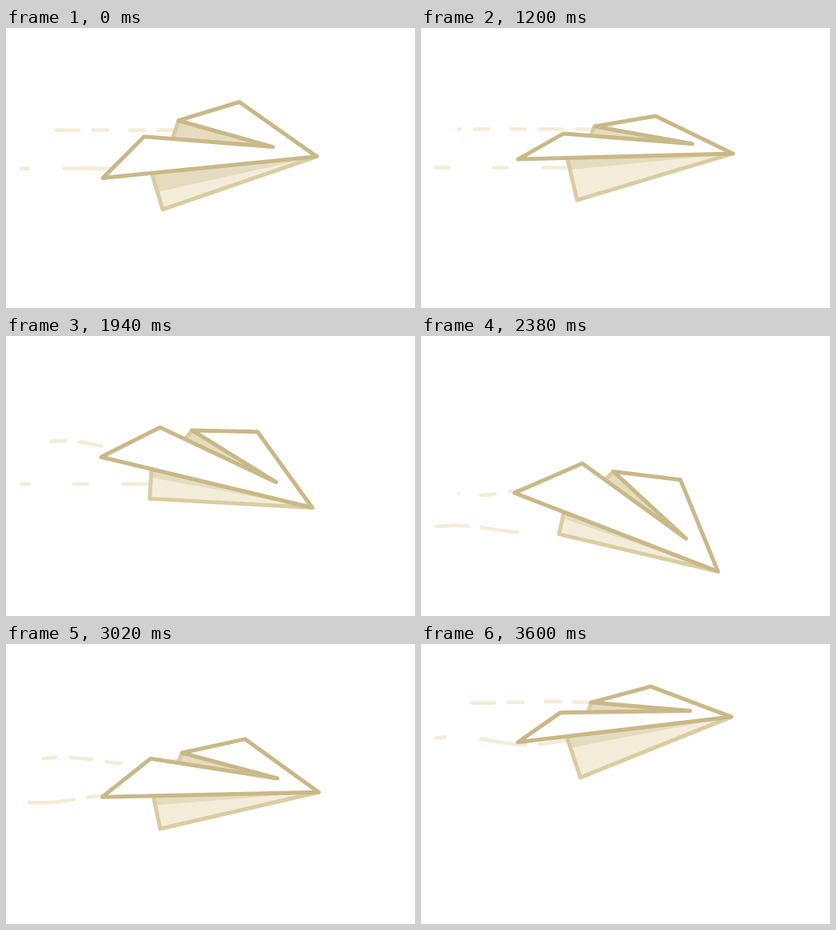
Recreate the animation shown at these times as an HTML page with a canvas. Size 512x350 px, loop 3.62 s.

```html
<!DOCTYPE html>
<html lang="en">
<head>
<meta charset="utf-8">
<title>Paper plane</title>
<style>
  html, body { margin: 0; width: 100%; height: 100%; overflow: hidden; background: #fff; }
  canvas { display: block; width: 512px; height: 350px; }
</style>
</head>
<body>
<canvas id="stage" width="512" height="350"></canvas>
<script>
const ctx = document.getElementById('stage').getContext('2d');
const LOOP = 3620, STEP = 20;
const COLOR = { trail: '#f4ecd9', wing: '#c9b888', keel: '#dacca1', light: '#f3ecd9', shade: '#e5dcc0' };

// Corners of the folded paper around the middle of its wing edge: fold, notch, far wing, far tip, keel
const LEVEL = [[-77, -30.5], [84, -13.5], [-37.5, -38.5], [39, -49.5], [-62, 53]];
const DIVING = [[-70.5, -65], [84.5, -24], [-30.5, -69.5], [51.5, -90], [-66, 28]];
const LAUNCHED = [[-78, -46.5], [81, -17.5], [-33, -62], [45, -77.5], [-64, 46.5]];

const trails = [
  { from: 47, to: 212, drop: 0, dash: [28, 18, 18, 28, 18, 18], start: 63, speed: .2487,
    trough: 72, swing: 6, peak: 1940, period: 960 },
  { from: 19, to: 182, drop: 48, dash: [57, 17, 45.5, 56, 17, 45], start: 73, speed: .3293,
    trough: 43, swing: 5, peak: 2270, period: 1320 }
];

// Eases between turning points, each a [time, value]
function sway(t, ...turns) {
  const next = turns.findIndex(([at]) => at > t);
  if (next < 0) return turns[turns.length - 1][1];
  if (next === 0) return turns[0][1];
  const [t0, v0] = turns[next - 1], [t1, v1] = turns[next];
  return v0 + (v1 - v0) * (1 - Math.cos(Math.PI * (t - t0) / (t1 - t0))) / 2;
}

function flightAt(t) {
  return {
    y: sway(t, [-680, 165], [740, 184.5], [1520, 147], [2600, 256], [3510, 102], [4050, 175]),
    tilt: sway(t, [0, -5.75], [1250, -1.5], [2390, 21.1], [3350, -9.3], [3850, -4.2]) * Math.PI / 180,
    roll: sway(t, [1260, 0], [2390, 1], [3600, 0]),
    launch: sway(t, [0, 1], [1220, 0])
  };
}

function shape(points, fill, stroke) {
  ctx.beginPath();
  points.forEach(p => ctx.lineTo(...p));
  ctx.closePath();
  if (fill) { ctx.fillStyle = fill; ctx.fill(); }
  if (stroke) { ctx.strokeStyle = stroke; ctx.lineWidth = 5; ctx.stroke(); }
}

function drawTrail(trail, t, { y, roll, launch }) {
  const height = y - 34 - 12.5 * launch - 18 * roll + trail.drop;
  const bend = trail.swing * sway(t, [1500, 0], [1900, 1]) * Math.cos(2 * Math.PI * (t - trail.peak) / trail.period);
  ctx.beginPath();
  for (let x = trail.from; x <= trail.to; x += 3) {
    ctx.lineTo(x, height - bend * Math.cos(2 * Math.PI * (x - trail.trough) / 180));
  }
  const length = trail.dash.reduce((sum, d) => sum + d);
  ctx.setLineDash(trail.dash);
  ctx.lineDashOffset = (trail.from - trail.start + trail.speed * t + length) % length;
  ctx.strokeStyle = COLOR.trail;
  ctx.lineWidth = 4.6;
  ctx.stroke();
  ctx.setLineDash([]);
}

function drawPlane({ y, tilt, roll, launch }) {
  const blend = (i, k) => {
    const base = LEVEL[i][k];
    return base + (DIVING[i][k] - base) * roll + (LAUNCHED[i][k] - base) * launch;
  };
  const [fold, notch, farWing, farTip, keel] = LEVEL.map((_, i) => [blend(i, 0), blend(i, 1)]);
  const reach = 134.5 + 2 * roll;
  const tail = [-reach, 0], nose = [reach, 0], hinge = [-73 + 3 * roll, 0];
  const shaded = .28 + .24 * launch;
  const crease = [hinge[0] + (keel[0] - hinge[0]) * shaded, keel[1] * shaded];
  const flap = [farWing[0] - 10, farWing[1] + 22];

  ctx.save();
  ctx.translate(256 - 86 * tilt * tilt, y);
  ctx.rotate(tilt);
  shape([farWing, flap, notch], COLOR.shade, COLOR.keel);
  shape([hinge, keel, nose], COLOR.light);
  shape([hinge, crease, nose], COLOR.shade);
  shape([hinge, keel, nose], null, COLOR.keel);
  shape([tail, fold, notch, farWing, farTip, nose], '#fff', COLOR.wing);
  ctx.restore();
}

function draw(now) {
  const t = Math.floor(now % LOOP / STEP) * STEP;
  const flight = flightAt(t);
  ctx.clearRect(0, 0, 512, 350);
  ctx.lineCap = ctx.lineJoin = 'round';
  trails.forEach(trail => drawTrail(trail, t, flight));
  drawPlane(flight);
}

const began = performance.now();
function tick() {
  draw(performance.now() - began);
  requestAnimationFrame(tick);
}
tick();
</script>
</body>
</html>
```
